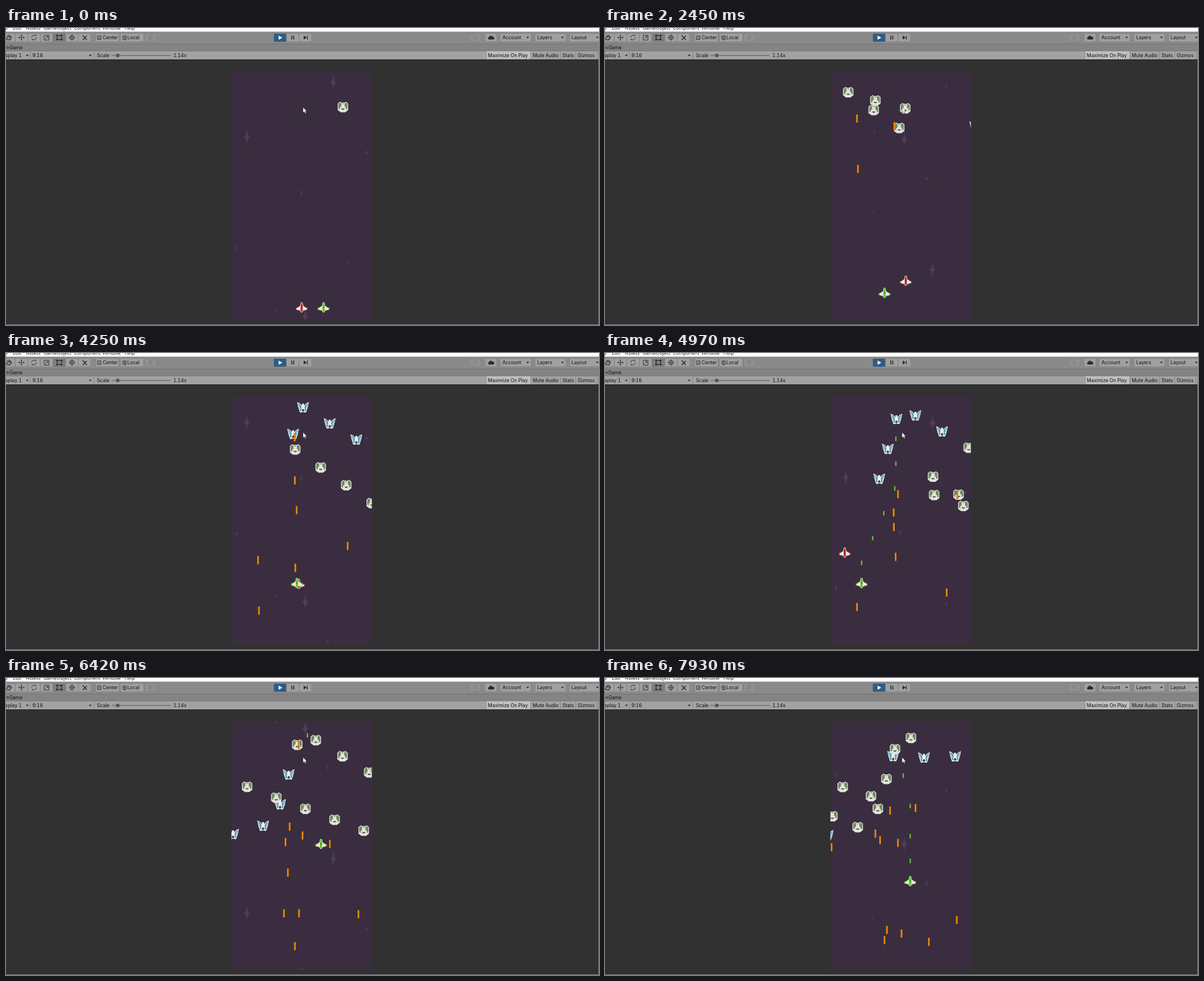
Recreate the animation shown at these times as an HTML page. Size 1056 px wide and 530 px high, loop 8000 ms.

```html
<!DOCTYPE html>
<html lang="en">
<head>
<meta charset="utf-8">
<title>Space shooter in an editor</title>
<style>
  html, body { margin: 0; width: 100%; height: 100%; overflow: hidden; background: #313131; }
  svg { display: block; width: 1056px; height: 530px; }
  text { font: 8.5px Inter, Roboto, sans-serif; font-feature-settings: "tnum"; fill: #101010; }
  .menu text { font: 8.5px "Open Sans", "Noto Sans", sans-serif; }
  .btn { fill: #a0a0a0; stroke: #777; stroke-width: .5; }
  .btn.on { fill: #7d7d7d; }
  .btn.play { fill: #2c5d87; }
  .btn.off { fill: #909090; }
  .line { fill: none; stroke: #2c2c2c; stroke-width: 1; }
</style>
</head>
<body>
<svg viewBox="0 0 1056 530" xmlns="http://www.w3.org/2000/svg">
  <defs>
    <clipPath id="field"><rect x="401.5" y="77" width="250" height="443"/></clipPath>
    <path id="star" fill="#5d4c72" d="M0-16Q.4-1.500 6 0Q.4 1.500 0 16Q-.4 1.500-6 0Q-.4-1.500 0-16Z"/>
    <g id="hull" fill="#ebe8e4">
      <path d="M-9.500 1.500L-3-2.500H3L9.500 1.500V4L3 5.500H-3L-9.500 4Z"/>
      <path d="M-1.500-9H1.500L3-2V6L1.300 9H-1.300L-3 6V-2Z"/>
      <path d="M-8 4.500L-3 5.700M8 4.500L3 5.700" stroke="#d8b43a"/>
    </g>
    <g id="red">
      <use href="#hull"/>
      <path d="M-10-.5V5M10-.5V5M-9 1.300L-4-2M9 1.300L4-2" stroke="#cc4038" stroke-width=".9"/>
      <path d="M-.8-8.200H.8L1.900-2V6L.8 8.200H-.8L-1.900 6V-2Z" fill="#bd2a2c"/>
      <path d="M0-4V1" stroke="#6e2428"/>
    </g>
    <g id="green">
      <use href="#hull"/>
      <path d="M-10-.5V5M10-.5V5M-9 1.300L-4-2M9 1.300L4-2" stroke="#58b52c" stroke-width=".9"/>
      <path d="M-.9-9H.9L2-2V6L.8 8.200H-.8L-2 6V-2Z" fill="#5fc42c"/>
      <path d="M-1.800 0H1.800" stroke="#31651f"/>
    </g>
    <g id="bug">
      <path d="M-5-9.500L-3-8H3L5-9.500L9.300-6V5.500L4 9.500H-4L-9.300 5.500V-6Z" fill="#e2e4dc"/>
      <path d="M-5-8L-3-6.500V-1L-5.500 1V4.500L-8 3V-5.500ZM5-8L3-6.500V-1L5.500 1V4.500L8 3V-5.500Z" fill="#71895a"/>
      <path d="M-2-7H2L1.500-5H-1.500Z" fill="#9aa48c"/>
      <path d="M-3.200 2.200Q0 3.500 3.200 2.200L1.500 4.800H-1.500Z" fill="#45414b"/>
    </g>
    <g id="moth">
      <path d="M-10.500-9.500L-6-7.500L-2-3V-6.500H2V-3L6-7.500L10.500-9.500L8.500 0L5.500 9H2.500L0 8L-2.500 9H-5.500L-8.500 0Z" fill="#eceff0"/>
      <path d="M-9-7.500L-5.500-5.500L-3-1.500L-3.500 7H-4.500L-7 0ZM9-7.500L5.500-5.500L3-1.500L3.500 7H4.500L7 0Z" fill="#2a86a8"/>
      <path d="M-7-5L-4.800 3M7-5L4.800 3" stroke="#dfeaee" stroke-width="1.100"/>
      <path d="M-1.500 3H1.500L2.200 7H-2.200Z" fill="#3f4149"/>
    </g>
    <g id="shot">
      <rect x="-1.600" y="-7.500" width="3.200" height="15" rx=".7" fill="#a65d08"/>
      <rect x="-.8" y="-7" width="2.200" height="14" rx=".6" fill="#ee8f0c"/>
    </g>
    <rect id="redLaser" x="-1.200" y="-4" width="2.400" height="8" rx=".6" fill="#c23a30"/>
    <rect id="greenLaser" x="-1.200" y="-4" width="2.400" height="8" rx=".6" fill="#68bf36"/>
    <path id="down" d="M-2.500-1.300H2.500L0 1.500Z" fill="#222"/>
  </defs>

  <rect width="1056" height="530" fill="#313131"/>
  <rect width="1056" height="7" fill="#fff"/>
  <g id="menu" class="menu"></g>
  <rect y="6.500" width="1056" height="22" fill="#8a8a8a"/>
  <rect y="28" width="1056" height="13" fill="#848484"/>
  <rect y="41" width="1056" height="15" fill="#a2a2a2"/>
  <path d="M0 28.500H1056M0 41H1056" stroke="#6c6c6c" stroke-width=".7"/>
  <path d="M0 56.500H1056" stroke="#222"/>
  <g id="buttons"></g>

  <g class="line">
    <path d="M2 21L0 17M2 21H7L10 16M3 18V13M5.500 17V12M8 17V13" stroke-width="1.500"/>
    <path d="M22.500 17H32.500M27.500 12V22M24 15.500L22.500 17L24 18.500M31 15.500L32.500 17L31 18.500M26 13.500L27.500 12L29 13.500M26 20.500L27.500 22L29 20.500"/>
    <path d="M45.500 17A4.300 4.300 0 0 1 53 14.400V12M54 17A4.300 4.300 0 0 1 46.500 19.800V22"/>
    <path d="M68 13H76.500V21.500H68ZM70 19.500L74.500 15M72 15H74.500V17.500"/>
    <path d="M91 13.500H99V20.500H91Z"/>
    <path d="M89.500 12H92.500V15H89.500ZM97.500 12H100.500V15H97.500ZM89.500 19H92.500V22H89.500ZM97.500 19H100.500V22H97.500Z" fill="#2c2c2c" stroke="none"/>
    <circle cx="117.500" cy="17" r="4"/><path d="M112 17H123M117.500 11.500V22.500"/>
    <path d="M136.500 21.500L144 14M136.500 13L144 21.500" stroke-width="1.600"/>
    <path d="M163 14H169V20.500H163Z"/><path d="M165.300 16.500H167.300V18.500H165.300Z" stroke="#b4352b"/>
    <path d="M208 15L211 13L214 15V19.500L211 21.500L208 19.500ZM208 15L211 17L214 15M211 17V21"/>
    <circle cx="213.500" cy="20" r="1" stroke="#b4352b"/>
    <path d="M254 14H261M254 17H261M254 20H259M255 13V21M258 13V21" stroke="#747474" stroke-dasharray="1.500 1"/>
    <path d="M509 13.500V20.500M512.500 13.500V20.500" stroke-width="1.700"/>
    <path d="M536.500 13.500V20.500" stroke-width="1.400"/>
    <path d="M835.500 12.500V21.500M831 17H840M832.300 13.800L838.700 20.200M838.700 13.800L832.300 20.200" stroke="#828282"/>
    <circle cx="3" cy="35" r="1.700"/>
  </g>
  <path d="M485.500 13.500L492 17.200L485.500 21Z" fill="#fff"/>
  <path d="M530 13.500L535.500 17L530 20.500Z" fill="#2c2c2c"/>
  <path d="M860 20.500A2.200 2.200 0 0 1 860 16.300A3.600 3.600 0 0 1 866.500 15.500A2.500 2.500 0 0 1 867.500 20.500Z" fill="#2c2c2c"/>

  <rect x="855" y="41.500" width="79" height="14" fill="#bfbfbf"/>
  <path d="M43.500 42V56M156.500 42V56M855 42V56M934.500 42V56M987.500 42V56M1014.500 42V56M1052.500 42V56" stroke="#7c7c7c" stroke-width=".7"/>
  <path d="M188 49H293" stroke="#555" stroke-width="1.200"/>
  <circle cx="199" cy="49" r="3.200" fill="#555"/>
  <g id="labels"></g>

  <g clip-path="url(#field)">
    <rect x="401" y="77" width="251" height="443" fill="#3a2d3f"/>
    <g id="scene"></g>
  </g>
  <path d="M529 141.500V151.200L531.300 149.200L532.900 152.800L534.400 152.100L532.900 148.700H535.800Z" fill="#fff" stroke="#222" stroke-width=".5"/>
  <path d="M0 529.500H1056M1055.500 28V530" stroke="#8a8a8a"/>
</svg>

<script>
const LOOP = 8;           // seconds
const el = id => document.getElementById(id);
const use = (id, x, y) => `<use href="#${id}" x="${x.toFixed(2)}" y="${y.toFixed(2)}"/>`;

// ---- editor chrome ----
const label = (s, x, y, anchor = 'start') => `<text x="${x}" y="${y}" text-anchor="${anchor}">${s}</text>`;
const labels = (y, items) => Object.entries(items).map(([s, x]) => label(s, x, y)).join('');
const button = (x, w, cls = '') => `<rect class="btn ${cls}" x="${x}" y="10" width="${w}" height="14.5" rx="1.5"/>`;

el('menu').innerHTML = label('File', 3, 2.5, 'end') +
  labels(2.5, { Edit: 12, Assets: 36, GameObject: 67, Component: 121, Window: 172, Help: 211 });

let bar = '';
for (let i = 0; i < 7; i++) bar += button(22.5 * i - 6, 22, i === 4 ? 'on' : '');
for (let i = 0; i < 3; i++) bar += button(477 + 22.5 * i, 22, i ? '' : 'play');
for (let i = 0; i < 3; i++) bar += button(880 + 62 * i, 55) + use('down', 929 + 62 * i, 17);
bar += button(160, 41) + button(204, 41) + button(247, 21, 'off') + button(825, 21, 'off') + button(853, 21);
el('buttons').innerHTML = bar;

el('labels').innerHTML = label('Display 1', 28, 52, 'end') + use('down', 38, 49) + use('down', 150, 49) +
  labels(20.3, { Center: 172, Local: 216, Account: 884, Layers: 946, Layout: 1007 }) +
  labels(38, { Game: 6 }) +
  labels(52, { '9:16': 47, Scale: 162, '1.14x': 298, 'Maximize On Play': 858, 'Mute Audio': 938, Stats: 991, Gizmos: 1018 });

// ---- motion helpers ----
const mix = (a, b, f) => a + (b - a) * f;

// place at time t among key points [time, x, y]
function keyed(keys, t) {
  const i = keys.findIndex(k => k[0] > t);
  if (i < 0) return keys[keys.length - 1].slice(1);
  const [a, b] = [keys[i - 1], keys[i]], f = (t - a[0]) / (b[0] - a[0]);
  return [mix(a[1], b[1], f), mix(a[2], b[2], f)];
}

// place at distance s along a polyline, or null when off it
function along(pts, s) {
  if (s < 0) return null;
  for (let i = 1; i < pts.length; i++) {
    const [ax, ay] = pts[i - 1], [bx, by] = pts[i], len = Math.hypot(bx - ax, by - ay);
    if (s <= len) return [mix(ax, bx, s / len), mix(ay, by, s / len)];
    s -= len;
  }
  return null;
}

// ---- backdrop ----
const SCROLL = 136.6, TILE = 651;
const stars = [ // x, y, scale
  [583, 97, 1], [429, 194, 1], [533, 515, 1], [642, 222, .5], [526, 293, .5],
  [411, 392, .5], [573, 585, .5], [478, 646, .4], [608, 420, .4], [480, 503, .4]];
const drawStars = t => stars.map(([x, y, k]) =>
  `<use href="#star" opacity="${.35 + .2 * k}" transform="translate(${x} ${(y + SCROLL * t) % TILE}) scale(${k})"/>`).join('');

// ---- enemies: each wave follows its path in single file ----
const GAP = 55.5;
const rowPath = [[653, 139], [526, 143.5], [431, 113], [700, 302]];
const peakPath = [[670, 182.3], [525.5, 95], [478.8, 258], [370, 288]];
const slopePath = [[690, 292.3], [424, 192], [383, 309]];
const waves = [ // start: when the leader enters; fire: shot times of each enemy
  { path: rowPath, start: 6.715, speed: 115.6, moths: 5, bugs: 0, fire: [] },
  { path: rowPath, start: -.451, speed: 117.3, moths: 0, bugs: 5, fire: [[1.31, 3.33], [2.14], [3.33], [2.15, 3.77, 4.95], [4.32]] },
  { path: peakPath, start: 2.345, speed: 115.6, moths: 5, bugs: 5, leaderDies: 5.55,
    fire: [[4.17], [5.25], [5.51], [5.89], [6.47], [6.33, 7.33], [7.25], [6.89]] },
  { path: slopePath, start: 4.011, speed: 115.6, moths: 0, bugs: 5, fire: [[5.79], [5.99, 7.49], [6.02], [7.38], [6.52]] }];

const enemyAt = (w, i, t) => i === 0 && t > w.leaderDies ? null : along(w.path, w.speed * (t - w.start) - i * GAP);

function enemies(t) {
  const out = [];
  for (const w of waves)
    for (let i = 0; i < w.moths + w.bugs; i++) {
      const at = enemyAt(w, i, t);
      if (at) out.push({ id: i < w.moths ? 'moth' : 'bug', at });
    }
  return out;
}

// ---- players: key points [time, x, y] and bursts [time, count] ----
const players = [
  { id: 'red', dies: 5.68, bursts: [[.54, 4], [5.32, 4]],
    keys: [[0, 526.5, 498.5], [.74, 526.5, 498.5], [.94, 553, 499], [1.9, 553, 499], [2.9, 521.5, 412], [4.4, 521.5, 412],
      [4.85, 427, 356], [4.97, 427, 356], [5.2, 412.5, 370], [5.62, 412.5, 323.6]] },
  { id: 'green', dies: 9, bursts: [[4.39, 6], [5.19, 2], [5.57, 5], [6.78, 2], [7.55, 4]],
    keys: [[0, 565.5, 498.5], [1.8, 565.5, 498.5], [2.8, 461.5, 458.5], [3.9, 461.5, 458.5], [4.2, 518, 410.5], [4.58, 518, 410.5],
      [4.89, 457, 410.5], [5, 457, 410.5], [5.57, 457, 322], [5.75, 496, 313], [6.1, 561, 296], [7, 561, 296],
      [7.55, 531, 343], [7.65, 543.5, 353], [7.75, 543.5, 362.5]] }];

const ships = t => players.filter(p => t < p.dies).map(p => ({ id: p.id, at: keyed(p.keys, t) }));

// ---- projectiles: fly straight until they hit a target or leave the field ----
const LASER = -443, RELOAD = .1, BUG_SHOT = 115.8, MOTH_SHOT = 186;

function launch(id, [x, y], speed, born, targets) {
  const hit = t => targets(t).some(({ at }) => Math.abs(at[0] - x) < 8.5 && Math.abs(at[1] - y - speed * (t - born)) < 8.5);
  const inside = t => Math.abs(y + speed * (t - born) - 298) < 235;
  let end = born;
  while (end < LOOP && inside(end) && !hit(end)) end += .02;
  return { id, x, y, speed, born, end };
}

const lasers = players.flatMap(p => p.bursts.flatMap(([start, n]) =>
  Array.from({ length: n }, (_, i) => start + i * RELOAD)
    .map(t => launch(p.id + 'Laser', keyed(p.keys, t), LASER, t, enemies))));

const shots = waves.flatMap(w => w.fire.flatMap((times, i) =>
  times.map(t => launch('shot', enemyAt(w, i, t), i < w.moths ? MOTH_SHOT : BUG_SHOT, t, ships))));

const drawFlying = (list, t) => list.filter(p => t >= p.born && t < p.end)
  .map(p => use(p.id, p.x, p.y + p.speed * (t - p.born))).join('');
const drawUnits = list => list.map(u => use(u.id, ...u.at)).join('');

function frame(now) {
  const t = now / 1000 % LOOP;
  el('scene').innerHTML = drawStars(t) + drawFlying(lasers, t) + drawUnits(enemies(t)) +
    drawFlying(shots, t) + drawUnits(ships(t));
  requestAnimationFrame(frame);
}
frame(0);
</script>
</body>
</html>
```
